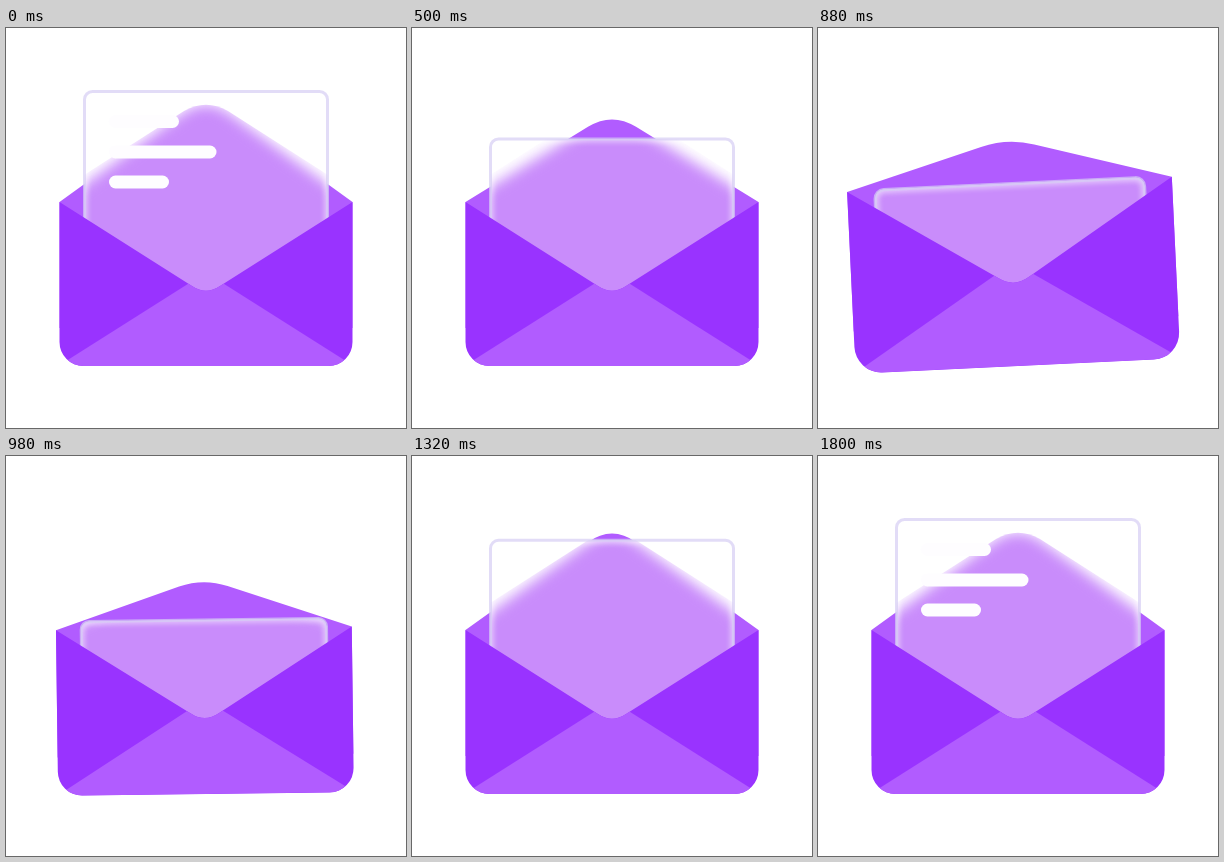
Animation, 400 px wide and 400 px high, one loop 2040 ms. Source, as an HTML page:

```html
<!DOCTYPE html>
<html lang="en">
<head>
<meta charset="utf-8">
<title>Envelope</title>
<style>
  html, body { margin: 0; width: 100%; height: 100%; overflow: hidden; background: #fff; }
  svg { display: block; width: 100%; height: 100%; }
</style>
</head>
<body>
<svg viewBox="0 0 400 400">
  <defs>
    <filter id="frost" filterUnits="userSpaceOnUse" x="0" y="0" width="400" height="400" color-interpolation-filters="sRGB">
      <feGaussianBlur stdDeviation="7"/>
    </filter>
    <filter id="soft" filterUnits="userSpaceOnUse" x="0" y="0" width="400" height="400" color-interpolation-filters="sRGB">
      <feGaussianBlur stdDeviation="2.5"/>
    </filter>
    <clipPath id="sheetClip"><rect class="sheet" x="78.5" width="243" rx="8"/></clipPath>
    <clipPath id="glassClip"><path d="M53 163 L178 83 Q200 70.5 222 83 L347 163 V300 H53 Z"/></clipPath>
    <clipPath id="frontClip"><path id="frontShape" d="M53.5 174 L186 258 Q200 267.5 214 258 L346.5 174 V314 A24 24 0 0 1 322.5 338 H77.5 A24 24 0 0 1 53.5 314 Z"/></clipPath>
  </defs>
  <g id="envelope">
    <path class="flap" fill="#b15cff"/>
    <g clip-path="url(#sheetClip)">
      <rect width="400" height="300" fill="#fff"/>
      <g clip-path="url(#glassClip)">
        <g filter="url(#frost)"><path class="flap" fill="#c98cfb"/></g>
      </g>
      <rect class="sheet" x="78.5" width="243" rx="8" fill="none" stroke="#fff" stroke-width="7" opacity=".45" filter="url(#soft)"/>
    </g>
    <rect class="sheet" x="78.5" width="243" rx="8" fill="none" stroke="rgb(214,206,244)" stroke-opacity=".7" stroke-width="3"/>
    <g id="lines" fill="none" stroke="#fefdff" stroke-width="13" stroke-linecap="round"></g>
    <use href="#frontShape" fill="#9933ff"/>
    <path d="M200 244.5 L50 339.5 H350 Z" fill="#b15cff" clip-path="url(#frontClip)"/>
  </g>
</svg>
<script>
const LOOP = 2040, STEP = 20;
const BASE = 174, LINE_X = 109.5;

// y, length, start and end of shrinking, start and end of growing
const LINES = [
  { y: 93.5, len: 57, out: [110, 310], in: [1465, 1680] },
  { y: 124, len: 94.5, out: [60, 260], in: [1535, 1750] },
  { y: 154, len: 47, out: [10, 200], in: [1600, 1800] }
];

// Each track is a list of [time, value], eased between neighbours.
const TRACKS = {
  sheet: [[300, 0], [740, 110], [880, 110], [1490, 0]],
  flap: [[365, 97], [780, 38], [870, 38], [1355, 97]],
  scale: [[765, 1], [865, 1.113], [1005, 1]],
  turn: [[765, 0], [875, -2.7], [1035, 0]]
};

const all = name => document.querySelectorAll('.' + name);
const byId = id => document.getElementById(id);
const flaps = all('flap'), sheets = all('sheet');
const envelope = byId('envelope'), lineGroup = byId('lines');

const bars = LINES.map(() =>
  lineGroup.appendChild(document.createElementNS('http://www.w3.org/2000/svg', 'path')));

function ease(t, from, to) {
  const p = Math.min(1, Math.max(0, (t - from) / (to - from)));
  return p * p * (3 - 2 * p);
}

function valueAt(track, t) {
  let value = track[0][1];
  for (let i = 1; i < track.length; i++) {
    const [t0, v0] = track[i - 1], [t1, v1] = track[i];
    if (t >= t0) value = v0 + (v1 - v0) * ease(t, t0, t1);
  }
  return value;
}

function flapPath(height) {
  const peak = BASE - height * 1.093;
  const bend = BASE - height * 0.913;
  return `M53.5 ${BASE} L176 ${bend} Q200 ${peak} 224 ${bend} L346.5 ${BASE} V300 H53.5 Z`;
}

function draw(t) {
  const drop = valueAt(TRACKS.sheet, t);
  const shape = flapPath(valueAt(TRACKS.flap, t));
  flaps.forEach(el => el.setAttribute('d', shape));
  sheets.forEach(el => {
    el.setAttribute('y', 63.5 + drop);
    el.setAttribute('height', 230 - drop);
  });

  lineGroup.setAttribute('transform', `translate(0 ${drop})`);
  LINES.forEach((line, i) => {
    const shown = 1 - ease(t, ...line.out) + ease(t, ...line.in);
    bars[i].setAttribute('visibility', shown > 0.0005 ? 'visible' : 'hidden');
    bars[i].setAttribute('d', `M${LINE_X} ${line.y} h${Math.max(0.01, line.len * shown)}`);
  });

  const scale = valueAt(TRACKS.scale, t), turn = valueAt(TRACKS.turn, t);
  envelope.setAttribute('transform',
    `translate(200 338) rotate(${turn}) scale(${scale}) translate(-200 -338)`);
}

const start = performance.now();
function tick() {
  const t = (performance.now() - start) % LOOP;
  draw(Math.floor(t / STEP) * STEP);
  requestAnimationFrame(tick);
}
draw(0);
requestAnimationFrame(tick);
</script>
</body>
</html>
```
